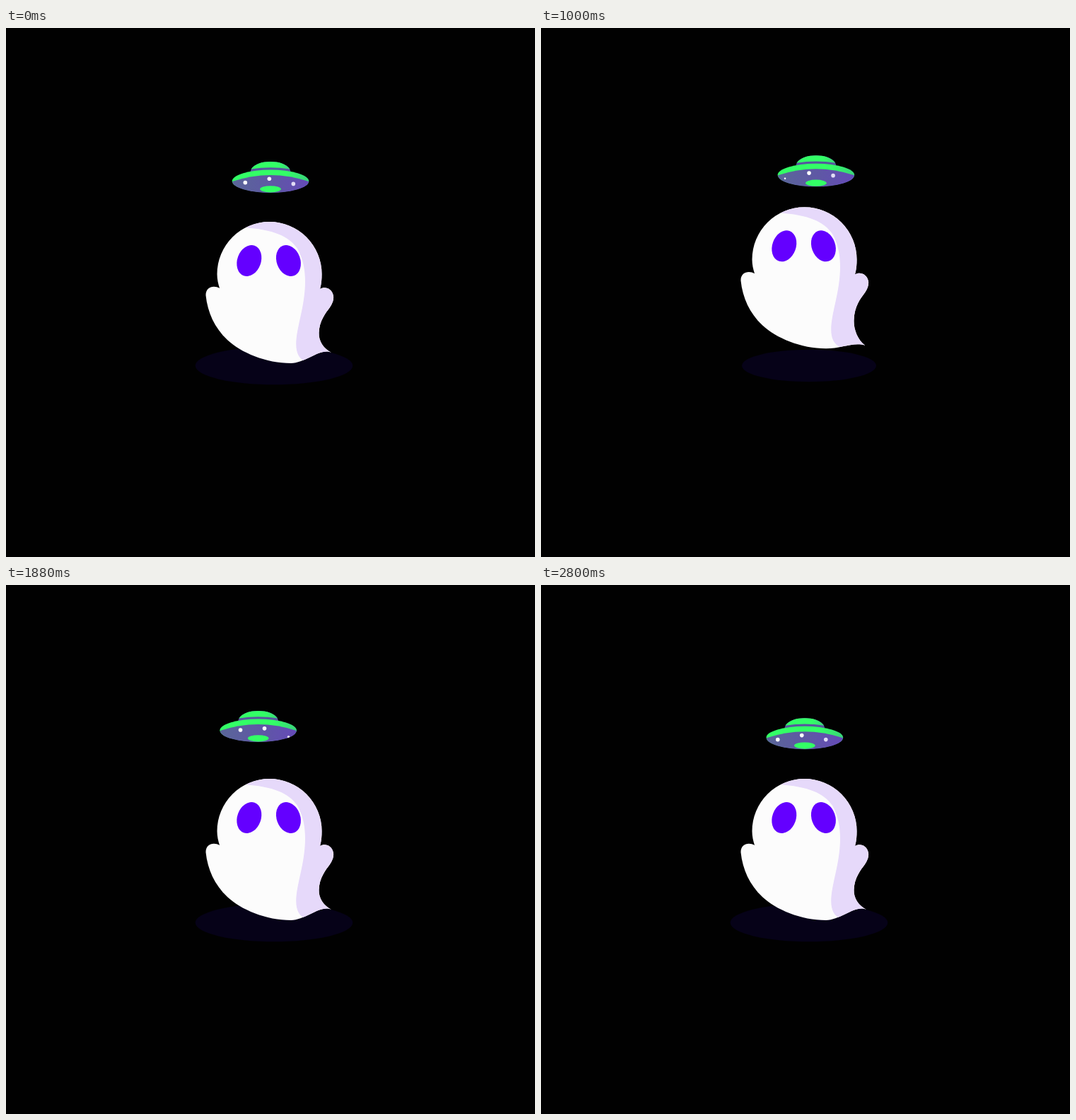
Write an HTML page that moves like this. It is 748 px wide and 748 px high and loops after 2.84 s.

```html
<!DOCTYPE html>
<html lang="en">
<head>
<meta charset="utf-8">
<title>Ghost and saucer</title>
<style>
  html, body { margin: 0; width: 100%; height: 100%; overflow: hidden; background: #010101; }
  svg { display: block; width: 100%; height: 100%; }
</style>
</head>
<body>
<svg viewBox="0 0 748 748">
  <defs>
    <linearGradient id="hull">
      <stop offset="0" stop-color="#5a6699"/>
      <stop offset=".55" stop-color="#5f57a5"/>
      <stop offset="1" stop-color="#654ab8"/>
    </linearGradient>
    <linearGradient id="rim">
      <stop offset=".68" stop-color="#33ff66"/>
      <stop offset="1" stop-color="#3ad37a"/>
    </linearGradient>
    <clipPath id="bodyClip"><path id="clipShape"/></clipPath>
    <clipPath id="hullClip"><path d="M-54 28Q0 10 54 28A54 16 0 0 1 -54 28Z"/></clipPath>
  </defs>

  <ellipse id="shadow" cx="379" cy="477.5" fill="#060218"/>

  <g id="ghost">
    <path id="body" fill="#fcfcfc"/>
    <path clip-path="url(#bodyClip)" fill="#e6d9fa"
      d="M336 282C378 285 400 294 412 312C428 340 424 375 416 410C410 437 404 464 424 472L445 490H490V260H336Z"/>
    <g id="eyes" fill="#6400ff">
      <ellipse rx="16.7" ry="22.6" transform="translate(343.8 329) rotate(20)"/>
      <ellipse rx="16.7" ry="22.6" transform="translate(399.4 329) rotate(-20)"/>
    </g>
  </g>

  <g id="ufo">
    <path d="M-28.5 14C-26 4 -13 0 0 0S26 4 28.5 14Z" fill="#57579f"/>
    <path d="M-27.5 10.5C-22 3 -12 0 0 0S22 3 27.5 10.5Q0 6 -27.5 10.5Z" fill="url(#rim)"/>
    <ellipse cy="27.5" rx="54.3" ry="16" fill="url(#rim)"/>
    <path d="M-54 28Q0 10 54 28A54 16 0 0 1 -54 28Z" fill="url(#hull)"/>
    <ellipse cy="38.8" rx="14.8" ry="4.6" fill="#33ff66"/>
    <g id="lights" clip-path="url(#hullClip)"></g>
  </g>
</svg>

<script>
const LOOP = 2840, STEP = 40;
const LIGHT_GAP = 34, LIGHT_TURNS = 5;
const $ = id => document.getElementById(id);
const set = (el, attrs) => { for (const k in attrs) el.setAttribute(k, attrs[k]); };
const mix = (a, b, p) => a + (b - a) * p;
const ease = p => (1 - Math.cos(Math.PI * Math.min(1, Math.max(0, p)))) / 2;

// Eases up from a to b, then back down until c.
const hump = (t, a, b, c) => t < b ? ease((t - a) / (b - a)) : 1 - ease((t - b) / (c - b));

// Saucer stops: time, centre x, top y; straight and even flight in between
const flight = [[0, 374, 189], [665, 402.8, 171.8], [1400, 372.3, 190.6], [2045, 351.3, 173.7], [LOOP, 374, 189]];

function saucerAt(t) {
  const i = flight.findIndex(stop => t < stop[0]);
  const [t0, x0, y0] = flight[i - 1], [t1, x1, y1] = flight[i];
  const p = (t - t0) / (t1 - t0);
  return [mix(x0, x1, p), mix(y0, y1, p)];
}

const lights = [-1, 0, 1].map(() =>
  $('lights').appendChild(document.createElementNS('http://www.w3.org/2000/svg', 'circle')));

// The tail tip hangs lower as droop goes from 0 to 1.
function bodyPath(droop) {
  const tipX = 460 - 4 * droop, tipY = 459 + 22.5 * droop;
  const bendY = 431 + 6 * droop;
  return 'M302 368C294 363 282 366 282.5 378C285 402 295 424 313 441C332 459 368 474 403 474' +
    `C424 474 ${tipX - 16} ${tipY - 7 + 4 * droop} ${tipX} ${tipY}` +
    `C${tipX - 11} ${tipY - 6 - 5 * droop} 442 ${bendY + 12} 442.5 ${bendY}` +
    'C443 414 452 403 458 395C462 389 463.5 384 463 379C461 368 451 365 444 369' +
    'C446 362 446.5 355 446.5 348A74 74 0 0 0 298.5 348C298.5 355 300 362 302 368Z';
}

function drawGhost(t) {
  const d = bodyPath(hump(t, 360, 735, 1240));
  set($('body'), { d });
  set($('clipShape'), { d });

  // Slight squash while rising, with the eyes leading the way
  const rise = Math.sin(Math.PI * Math.min(1, t / 710));
  const lift = -28.5 * hump(t, 0, 710, 1535);
  set($('ghost'), { transform: `translate(0 ${374 + lift}) scale(1 ${1 - 0.014 * rise}) translate(0 -374)` });
  set($('eyes'), { transform: `translate(0 ${-1.9 * rise})` });

  const rx = 111.3 - 25.6 * hump(t, 0, 700, 1430);
  set($('shadow'), { rx, ry: rx * 0.24 });
}

function drawSaucer(t) {
  set($('ufo'), { transform: `translate(${saucerAt(t)})` });
  const phase = (LIGHT_TURNS * t / LOOP + 0.45) % 1 - 0.5;
  lights.forEach((el, i) => {
    const x = LIGHT_GAP * (phase + i - 1);
    set(el, {
      cx: x,
      cy: 24.3 + x * x * (x < 0 ? 0.0042 : 0.0068),
      r: Math.min(2.8, Math.max(0, (46 - Math.abs(x)) * 0.6)),
      fill: x > 24 ? '#e2dcf6' : '#fff'
    });
  });
}

const start = performance.now();
function tick() {
  const t = Math.floor((performance.now() - start) % LOOP / STEP) * STEP;
  drawGhost(t);
  drawSaucer(t);
  requestAnimationFrame(tick);
}
tick();
</script>
</body>
</html>
```
